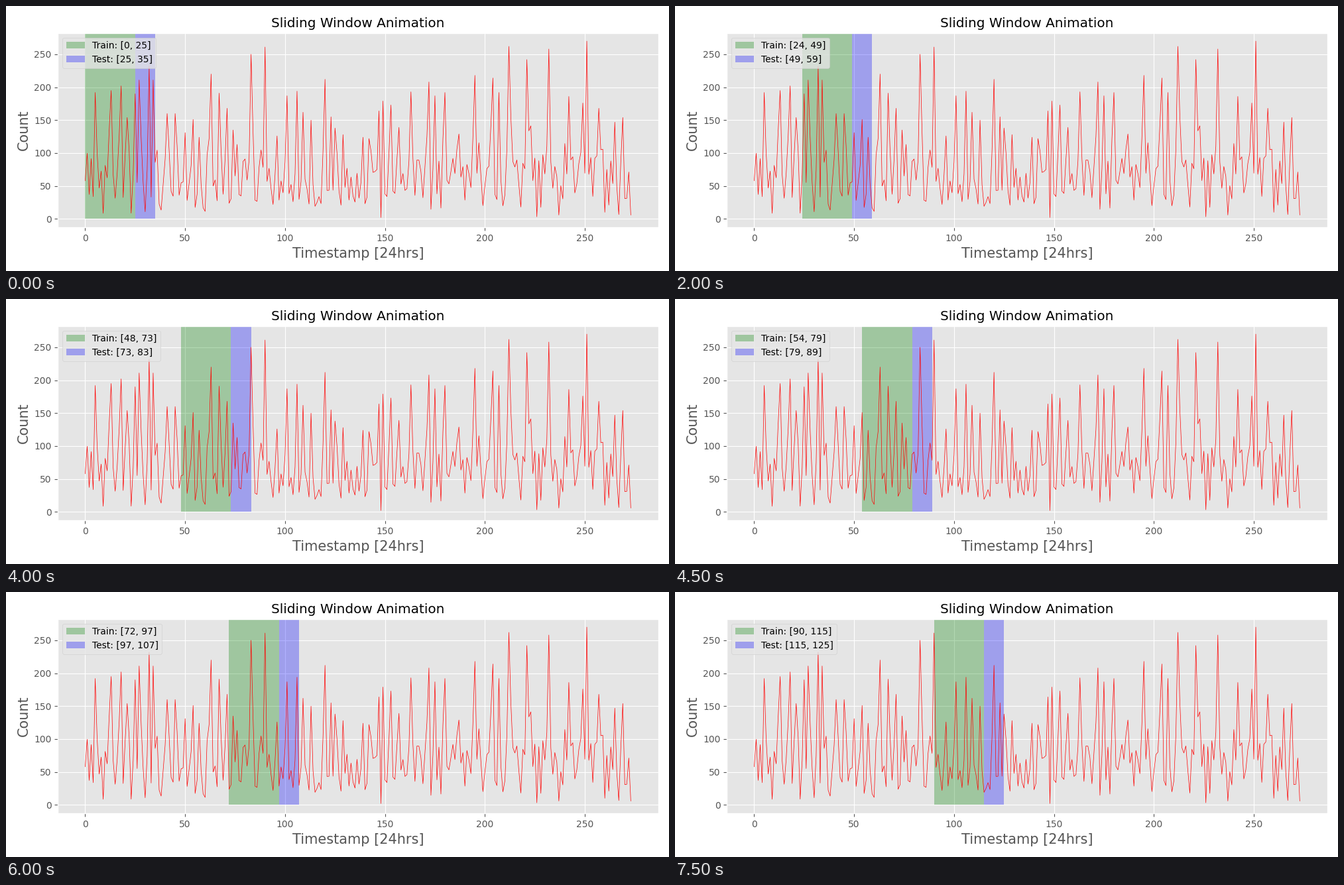
Write a matplotlib script that moves like this. It is 1000 px wide and 400 px high and loops after 8 s.

```python
import matplotlib.pyplot as plt
import numpy as np
from matplotlib.animation import FuncAnimation
from matplotlib.patches import Rectangle

TRAIN, TEST, STEP = 25, 10, 6
FRAMES, INTERVAL = 16, 500
FLOOR, TOP = 0, 300

# Main peaks of the series as (timestamp, count)
PEAKS = [
    (0, 58), (5, 192), (13, 195), (18, 202), (21, 154), (25, 190), (27, 211),
    (32, 232), (34, 211), (41, 160), (45, 160), (50, 131), (54, 151),
    (57, 124), (63, 220), (67, 191), (71, 168), (74, 135), (83, 250),
    (90, 261), (96, 126), (101, 187), (106, 194), (109, 162), (113, 150),
    (120, 212), (123, 155), (125, 138), (129, 128), (139, 124), (142, 122),
    (147, 164), (149, 179), (153, 173), (157, 139), (163, 193), (172, 208),
    (175, 187), (180, 192), (187, 129), (195, 218), (204, 214), (207, 192),
    (212, 262), (221, 242), (232, 258), (242, 186), (249, 176), (251, 270),
    (257, 168), (265, 147), (269, 154), (273, 6),
]


def make_series(peaks, seed=4):
    """Join the peaks with noisy dips that sag towards the middle of each gap."""
    rng = np.random.default_rng(seed)
    px, py = np.array(peaks).T
    counts = np.interp(np.arange(px[-1] + 1), px, py)
    for a, b in zip(px[:-1], px[1:]):
        gap = np.arange(a + 1, b)
        sag = 0.5 * (2 * (gap - a) / (b - a) - 1) ** 2
        noise = 2 + 90 * rng.random(gap.size) ** 1.5
        counts[gap] = counts[gap] * sag + noise
    return counts


plt.style.use("ggplot")
plt.rcParams["font.family"] = "DejaVu Sans"

fig, ax = plt.subplots(figsize=(10, 4), dpi=100)
fig.subplots_adjust(left=0.0783, right=0.9835, bottom=0.16425, top=0.8985)

ax.plot(make_series(PEAKS), color="red", linewidth=0.5)
ax.set_xlim(-13.65, 286.65)
ax.set_ylim(-13, 282.5)
ax.set_title("Sliding Window Animation")
ax.set_xlabel("Timestamp [24hrs]", fontsize=15)
ax.set_ylabel("Count", fontsize=15)


def add_window(width, color):
    box = Rectangle((0, FLOOR), width, TOP, facecolor=color, alpha=0.3, linewidth=0)
    return ax.add_patch(box)


train_box = add_window(TRAIN, "green")
test_box = add_window(TEST, "blue")


def update(frame):
    start = frame * STEP
    split = start + TRAIN
    end = split + TEST
    train_box.set_x(start)
    test_box.set_x(split)
    train_box.set_label(f"Train: [{start}, {split}]")
    test_box.set_label(f"Test: [{split}, {end}]")
    legend = ax.legend(handles=[train_box, test_box], loc="upper left")
    return train_box, test_box, legend


anim = FuncAnimation(fig, update, frames=FRAMES, interval=INTERVAL,
                     repeat=True, blit=False)
plt.show()
```
